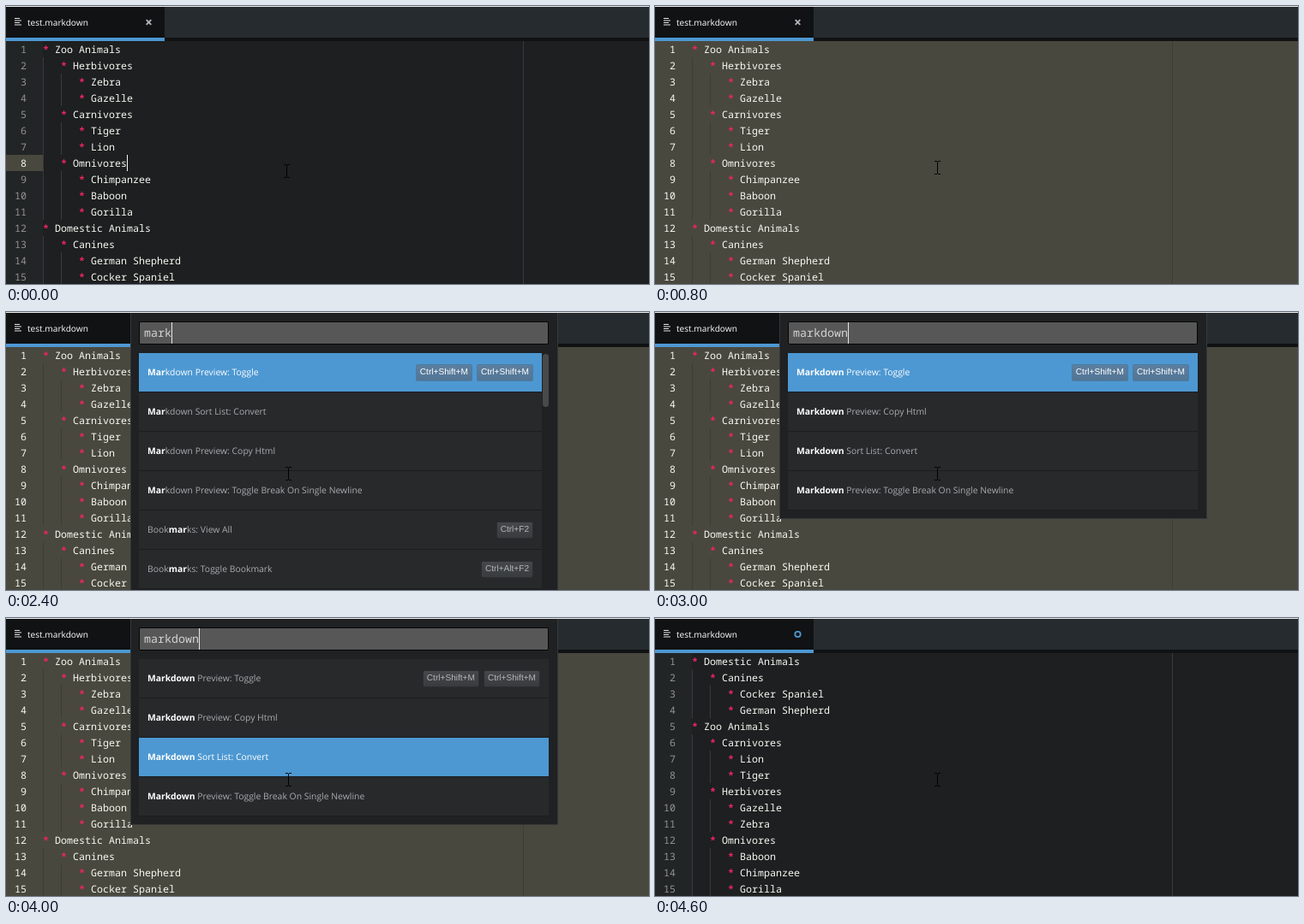
Write an HTML page that moves like this. It is 750 by 325 pixels and loops after 5700 ms.

```html
<!DOCTYPE html>
<html lang="en">
<head>
<meta charset="utf-8">
<title>Sorting a markdown list</title>
<style>
  html, body { margin: 0; width: 100%; height: 100%; overflow: hidden; background: #1d1f20; }
  body { position: relative; text-rendering: geometricPrecision; }
  svg { position: absolute; left: 0; top: 0; }
  .mono { font: 500 11.667px "Noto Sans Mono", monospace; white-space: pre; }
  .star { fill: #f02560; font-weight: 700; }
  .title { font: 500 10.15px "Open Sans", sans-serif; }
  #palette {
    position: absolute; left: 145px; top: 1px; width: 499px; box-sizing: border-box;
    background: #1f2123; border: 1px solid #34373a; border-top: 0; overflow: hidden;
    font: 10.4px/46px "Open Sans", sans-serif; color: #a9abad;
  }
  #palette div { position: absolute; box-sizing: border-box; }
  #input {
    left: 9px; top: 10px; width: 478px; height: 27px; padding-left: 5px;
    background: #575757; border: 1px solid #050505; border-radius: 2px;
    font: 500 13.333px/25px "Noto Sans Mono", monospace; color: #d2d2d2; white-space: pre;
  }
  #caret { top: 0; width: 1px; height: 25px; background: #e6e6e6; }
  #palette .row { left: 9px; height: 46px; padding: 0 10px; background: #27292b; border-bottom: 1px solid #1b1d1f; white-space: pre; }
  #palette .row.on { background: #4d98d2; color: #fff; }
  b { color: #fff; font-weight: 700; }
  kbd {
    float: right; box-sizing: border-box; height: 20px; margin: 13px 0 0 5px; padding: 0 4px;
    font: 10.1px/18px "Liberation Sans", Arial, sans-serif; color: #b4b6b8;
    background: linear-gradient(#45484a, #393c3e); border: 1px solid #2b2d2f; border-radius: 2px;
  }
  .on kbd { color: #fff; background: linear-gradient(#5d7f9f, #527595); border-color: #4a7ba6; }
  #palette .thumb { left: 480px; top: 48px; width: 7px; border-radius: 4px; background: #47494b; }
</style>
</head>
<body>
<svg id="editor" width="750" height="325"></svg>
<div id="palette"></div>
<svg width="750" height="325"><path id="mouse" stroke="#000" fill="none" d="M.5-7v14M-3-7.5h3m1 0h3M-3 7.5h3m1 0h3"/></svg>
<script>
const LOOP = 5700, OPEN = 1600, SORTED = 4400;
const $ = id => document.getElementById(id);

// Leading dashes give the depth of each list item
const before = `Zoo Animals,-Herbivores,--Zebra,--Gazelle,-Carnivores,--Tiger,--Lion,-Omnivores,
--Chimpanzee,--Baboon,--Gorilla,Domestic Animals,-Canines,--German Shepherd,--Cocker Spaniel`;
const after = `Domestic Animals,-Canines,--Cocker Spaniel,--German Shepherd,Zoo Animals,-Carnivores,
--Lion,--Tiger,-Herbivores,--Gazelle,--Zebra,-Omnivores,--Baboon,--Chimpanzee,--Gorilla`;

const toggle = 'Markdown Preview: Toggle|Ctrl+Shift+M|Ctrl+Shift+M',
  copy = 'Markdown Preview: Copy Html',
  sort = 'Markdown Sort List: Convert',
  lineBreak = 'Markdown Preview: Toggle Break On Single Newline';
const commands = [
  [OPEN, ['Application: About', 'Application: Add Project Folder|Ctrl+Alt+O',
    'Application: Bring All Windows To Front', 'Application: Hide',
    'Application: Hide Other Applications', 'Application: Install Update']],
  [2200, [toggle, sort, copy, lineBreak, 'Bracket Matcher: Close Tag|Ctrl+Alt+.',
    'Bracket Matcher: Go To Matching Bracket|Ctrl+M']],
  [2400, [toggle, sort, copy, lineBreak, 'Bookmarks: View All|Ctrl+F2',
    'Bookmarks: Toggle Bookmark|Ctrl+Alt+F2']],
  [2600, [toggle, copy, sort, lineBreak]]
];
const typed = [[0, ''], [2000, 'm'], [2200, 'mar'], [2400, 'mark'], [2600, 'markdo'], [2800, 'markdow'], [3000, 'markdown']];
const query = [[0, ''], [2200, 'ma'], [2400, 'mar'], [2600, 'markd'], [2800, 'markdow'], [3000, 'markdown']];
const thumb = [[0, 16], [2200, 36], [2400, 62], [2600, 0]];
const chosen = [[0, 0], [3600, 1], [3800, 2]];
const caretOn = [[0, true], [1800, false], [2000, true], [3600, false], [4000, true]];

const at = (steps, t) => steps.filter(s => s[0] <= t).pop()[1];
const rect = (x, y, w, h, fill) => `<rect x="${x}" y="${y}" width="${w}" height="${h}" fill="${fill}"/>`;
const text = (x, y, str, cls = 'mono', more = 'fill="#f8f8f2"') =>
  `<text x="${x}" y="${y}" class="${cls}" ${more}>${str}</text>`;

function drawEditor(t) {
  const selected = t >= 600 && t < SORTED;
  const guide = selected ? '#3e3d35' : '#383b3d';
  let s = rect(0, 0, 750, 325, '#262b2f') + rect(0, 0, 750, 1, '#ececec')
    + rect(0, 1, 185, 40, '#101213') + rect(0, 37, 750, 4, '#101213') + rect(0, 37, 185, 4, '#4d98d2')
    + '<path d="M10 14.5h6m-6 2.5h8m-8 2.5h6m-6 2.5h8" stroke="#e4e6e8" stroke-width="1.2"/>'
    + text(25, 23, 'test.markdown', 'title', 'fill="#fff"')
    + (t < 4600
      ? '<path d="M163.7 16.2l5.6 5.6m0-5.6l-5.6 5.6" stroke="#b4b7b9" stroke-width="1.8"/>'
      : '<circle cx="166.5" cy="19" r="3.2" fill="none" stroke="#4d98d2" stroke-width="1.8"/>')
    + rect(0, 41, 750, 284, selected ? '#49483e' : '#1d1f20');
  if (!selected) s += rect(0, 41, 43, 284, '#222526');
  if (t < 600) s += rect(0, 174, 43, 19, '#49483e');
  s += rect(603, 41, 1, 284, guide);

  (t < SORTED ? before : after).split(/,\s*/).forEach((item, i) => {
    const depth = item.match(/^-*/)[0].length, x = 43 + depth * 21, y = 41 + i * 19;
    const lit = selected || (t < 600 && i === 7);
    for (let d = 0; d < depth; d++) s += rect(43 + d * 21, y, 1, 19, guide);
    s += text(24, y + 14, i + 1, 'mono', `text-anchor="end" fill="${lit ? '#f8f8f2' : '#929490'}"`)
      + text(x, y + 14, '*', 'mono star', '') + text(x + 14, y + 14, item.slice(depth));
  });
  if (t < 600) s += rect(141, 174, 1, 19, '#f8f8f0');
  $('editor').innerHTML = s;
}

function drawPalette(t) {
  const box = $('palette');
  const open = t >= OPEN && t < SORTED;
  box.style.display = open ? 'block' : 'none';
  if (!open) return;
  const rows = at(commands, t), word = at(typed, t), bar = at(thumb, t);
  const match = new RegExp(at(query, t), 'i');
  box.style.height = (bar ? 330 : 241) + 'px';
  let s = `<div id="input">${word}`
    + (at(caretOn, t) ? `<div id="caret" style="left:${5 + word.length * 8}px"></div>` : '') + '</div>';
  rows.forEach((row, i) => {
    const [name, ...keys] = row.split('|');
    s += `<div class="row ${i === at(chosen, t) ? 'on' : ''}" style="top:${47 + i * 46}px;width:${bar ? 470 : 478}px">`
      + keys.map(k => `<kbd>${k}</kbd>`).join('')
      + name.replace(match, m => m && `<b>${m}</b>`) + '</div>';
  });
  if (bar) s += `<div class="thumb" style="height:${bar}px"></div>`;
  box.innerHTML = s;
}

let last = -1;
function frame() {
  const t = Math.floor(performance.now() % LOOP / 200) * 200;
  if (t !== last) {
    last = t;
    drawEditor(t);
    drawPalette(t);
    $('mouse').setAttribute('transform', t < 600 ? 'translate(327 193)' : 'translate(329 189)');
    $('mouse').style.display = t === 600 ? 'none' : '';
  }
  requestAnimationFrame(frame);
}
frame();
</script>
</body>
</html>
```
